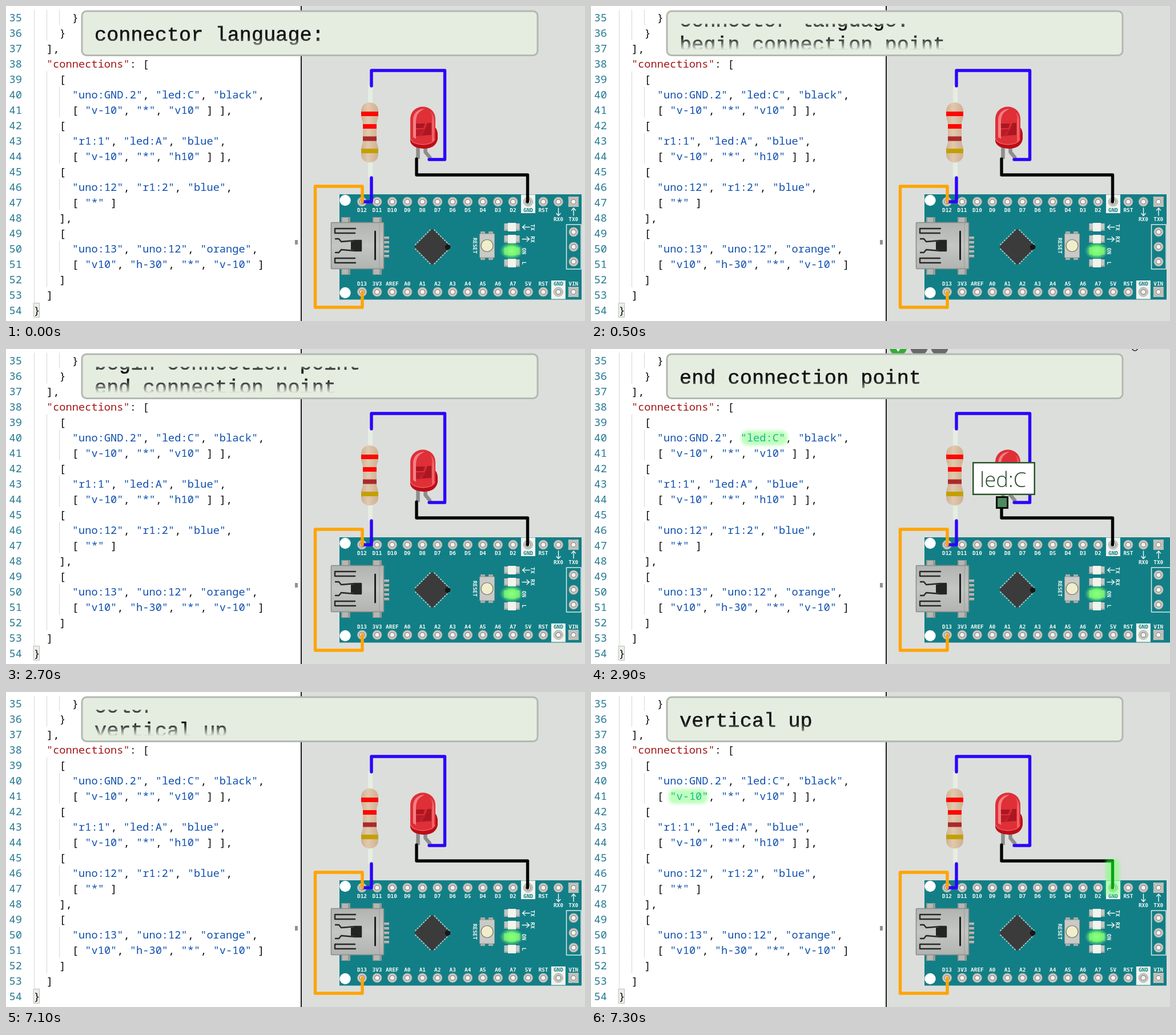
Recreate the animation shown at these times as an HTML page with a canvas. Size 1014x552 px, loop 8000 ms.

```html
<!DOCTYPE html>
<html lang="en">
<head>
<meta charset="utf-8">
<title>Connections explained</title>
<style>
html, body { margin: 0; width: 100%; height: 100%; overflow: hidden; background: #fff; }
canvas { display: block; }
</style>
</head>
<body>
<canvas id="stage" width="1014" height="552"></canvas>
<script>
(() => {
const ctx = document.getElementById('stage').getContext('2d');
const TAU = Math.PI * 2;
const CODE = '18.7px "Noto Sans Mono", "DejaVu Sans Mono", monospace';
const SILK = 'bold 9.4px "DejaVu Sans Mono", monospace';
const TITLE = '35.25px "Liberation Mono", "Courier New", monospace';
const LABEL = '300 36.5px "Open Sans", "Noto Sans", sans-serif';
const TEAL = '#127f86';

function rect(x, y, w, h, fill) {
  ctx.fillStyle = fill;
  ctx.fillRect(x, y, w, h);
}

function round(x, y, w, h, r, fill, stroke, width = 1) {
  ctx.beginPath();
  ctx.roundRect(x, y, w, h, r);
  if (fill) { ctx.fillStyle = fill; ctx.fill(); }
  if (stroke) { ctx.strokeStyle = stroke; ctx.lineWidth = width; ctx.stroke(); }
}

function disc(x, y, r, fill, stroke, width = 1) {
  ctx.beginPath();
  ctx.arc(x, y, r, 0, TAU);
  if (fill) { ctx.fillStyle = fill; ctx.fill(); }
  if (stroke) { ctx.strokeStyle = stroke; ctx.lineWidth = width; ctx.stroke(); }
}

function line(d, color, width, cap = 'round') {
  ctx.strokeStyle = color;
  ctx.lineWidth = width;
  ctx.lineCap = cap;
  ctx.lineJoin = 'round';
  ctx.stroke(new Path2D(d));
}

function shape(d, fill) {
  ctx.fillStyle = fill;
  ctx.fill(new Path2D(d));
}

function text(str, x, y, font, fill, align = 'left') {
  ctx.font = font;
  ctx.fillStyle = fill;
  ctx.textAlign = align;
  ctx.fillText(str, x, y);
}

function turned(str, x, y) {
  ctx.save();
  ctx.translate(x, y);
  ctx.rotate(Math.PI / 2);
  text(str, 0, 3.4, SILK, '#f2f7f4', 'center');
  ctx.restore();
}

// ---- code editor ----
const rows = [
  '      }', '    }', '  ],', '  "connections": [', '    [',
  '      "uno:GND.2", "led:C", "black",', '      [ "v-10", "*", "v10" ] ],', '    [',
  '      "r1:1", "led:A", "blue",', '      [ "v-10", "*", "h10" ] ],', '    [',
  '      "uno:12", "r1:2", "blue",', '      [ "*" ]', '    ],', '    [',
  '      "uno:13", "uno:12", "orange",', '      [ "v10", "h-30", "*", "v-10" ]',
  '    ]', '  ]', '}'
];
const colX = n => 48.5 + 11.22 * n;

function editor() {
  rect(0, 0, 517, 552, '#fff');
  rows.forEach((row, i) => {
    const y = 20 + 27 * i;
    const indent = row.search(/\S/);
    for (let c = 0; c < indent; c += 2) rect(Math.round(colX(c)), y - 13.5, 1, 27, '#d6d6d6');
    if (!indent) round(48.5, y - 12.5, 10, 25, 0, '#eaf0e8', '#b9b9b9');
    text(35 + i, 5.5, y + 6.5, CODE, '#237893');
    for (const m of row.matchAll(/"[^"]*"|[^\s"]+/g)) {
      const s = m[0];
      const color = s === '"connections"' ? '#a31515' : s[0] === '"' ? '#0f4fae' : '#0c0c0c';
      text(s, colX(m.index), y + 6.5, CODE, color);
    }
  });
  rect(506, 410, 5, 8, '#929292');
  rect(516, 0, 2, 552, '#1c1c1c');
}

// ---- circuit ----
const upperPins = 'D12 D11 D10 D9 D8 D7 D6 D5 D4 D3 D2 GND RST RX0 TX0'.split(' ');
const lowerPins = 'D13 3V3 AREF A0 A1 A2 A3 A4 A5 A6 A7 5V RST GND VIN'.split(' ');
const pinX = i => 623.5 + 26.45 * i;

function pin(x, y, square) {
  if (square) rect(x - 9, y - 9, 18, 18, '#c3c3be');
  disc(x, y, 8, '#cbcac5', '#a9aaa6');
  disc(x, y, 4.3, '#f4f5f3', '#8e8f8c', 1.4);
}

function header(names, y, labelY, boxY) {
  names.forEach((name, i) => {
    const x = pinX(i), gnd = name === 'GND';
    const low = /[RT]X0/.test(name);
    if (gnd) rect(x - 12.5, boxY, 25, 32.5, '#f1f5f0');
    pin(x, y, i === 14);
    text(name, x, low ? 376.5 : labelY, SILK, gnd ? TEAL : '#f4f8f5', 'center');
  });
}

function usb() {
  for (const x of [587, 642]) for (const y of [370, 459]) {
    rect(x, y, 16, 12, '#969995');
    rect(x + 2, y + 1, 10, 10, '#b4b7b3');
  }
  for (let i = 0; i < 5; i++) {
    rect(661, 404 + i * 8, 10, 5, '#b9bbb7');
    rect(661, 407.5 + i * 8, 10, 1.5, '#808480');
  }
  const g = ctx.createLinearGradient(0, 380, 0, 460);
  g.addColorStop(0, '#b2b4b1');
  g.addColorStop(0.5, '#c4c6c3');
  g.addColorStop(1, '#b2b4b1');
  round(569.5, 379.5, 92, 81, 1, g, '#8a8c89', 1.6);
  line('M654 381V459', '#a0a29f', 1.2);
  line('M612 390H576V398H611M612 450H576V442H611', '#272727', 2.4);
  line('M577 408L583 408L587 413L611 411H622V429H611L587 427L583 432L577 432', '#272727', 2.4);
  shape('M604 413L623 410V430L604 427Z', '#242424');
  line('M646.5 395V444', '#1f1f1f', 3);
}

function chip() {
  ctx.save();
  ctx.translate(746.5, 422);
  ctx.rotate(Math.PI / 4);
  for (let side = 0; side < 4; side++) {
    for (let i = -3.5; i <= 3.5; i++) rect(i * 5 - 1.4, -24.5, 2.8, 4, '#c4c8c4');
    ctx.rotate(Math.PI / 2);
  }
  round(-22.5, -22.5, 45, 45, 2, '#3b3b3c');
  ctx.restore();
  disc(773.5, 422.5, 4.8, '#171717');
}

function resetAndLeds() {
  turned('RESET', 821.5, 420);
  for (const x of [831, 845]) for (const y of [395, 439]) rect(x, y, 8, 6, '#a9aba7');
  round(829.5, 399, 26, 42, 1, '#c9cac7', '#94978f');
  disc(842.5, 420, 10.5, '#f0eeca', '#77796f', 1.2);
  for (let i = 0; i < 4; i++) {
    const y = 387.5 + 21 * i;
    rect(872.5, y - 6.5, 27, 13, '#c3c5c1');
    rect(879, y - 7.5, 14, 15, '#f2f4ee');
    rect(872.5, y + 4, 6.5, 2.5, '#a4a8a3');
    rect(893, y + 4, 6.5, 2.5, '#a4a8a3');
  }
  const g = ctx.createRadialGradient(0, 0, 1, 0, 0, 21);
  g.addColorStop(0, '#8cff80');
  g.addColorStop(0.5, 'rgba(112,246,108,.95)');
  g.addColorStop(1, 'rgba(80,230,110,0)');
  ctx.save();
  ctx.translate(885.5, 429);
  ctx.scale(1, 0.72);
  disc(0, 0, 21, g);
  ctx.restore();
  line('M917 387.5H905M909 383.5L904.5 387.5L909 391.5', '#f2f7f4', 1.5);
  line('M904 408.5H916M912 404.5L916.5 408.5L912 412.5', '#f2f7f4', 1.5);
  turned('TX', 922.5, 388);
  turned('RX', 922.5, 409);
  turned('ON', 907, 429.5);
  turned('L', 907, 450.5);
}

function board(edge) {
  rect(584, 330, edge - 584, 184.5, TEAL);
  disc(594, 340.5, 9.7, '#fff');
  disc(594, 502.5, 9.7, '#fff');
  header(upperPins, 343, 361.3, 330.5);
  header(lowerPins, 501, 490.3, 481);
  line('M967.5 354V367M964 363.5L967.5 367.5L971 363.5', '#f2f7f4', 1.4);
  line('M994 367V354M990.5 358L994 354L997.5 358', '#f2f7f4', 1.4);
  round(981.5, 383, edge > 1008 ? 40 : 25.5, 78, 0, null, '#dcebe8', 1.5);
  for (const y of [396, 422, 448]) pin(994, y);
  usb();
  chip();
  resetAndLeds();
}

function resistor() {
  rect(634, 139, 8, 162, '#e6ede2');
  const g = ctx.createLinearGradient(622, 0, 652, 0);
  g.addColorStop(0, '#cfb294');
  g.addColorStop(0.4, '#e2c9ae');
  g.addColorStop(1, '#cdb091');
  const body = new Path2D('M622 184C622 164 652 164 652 184V190C652 200 649 200 649 208V236' +
    'C649 244 652 244 652 252V260C652 279 622 279 622 260V252C622 244 625 244 625 236V208C625 200 622 200 622 190Z');
  ctx.fillStyle = g;
  ctx.fill(body);
  ctx.save();
  ctx.clip(body);
  rect(620, 185, 34, 8, '#fe0705');
  rect(620, 207, 34, 8, '#fe0705');
  rect(620, 228.5, 34, 8, '#aa2a2c');
  rect(620, 250, 34, 8, '#c3a000');
  ctx.restore();
}

function led() {
  line('M721.5 245V268', '#8d8d8d', 6.5, 'butt');
  line('M734.5 245V256L742 265', '#8d8d8d', 6.5);
  shape('M708 226H745L751 212Q756 217 756 226V233Q753 250 731 250Q711 249 708 237Z', '#bd0d17');
  shape('M708 199C708 169 752 169 752 199V232C751 246 709 246 708 232Z', '#df2f37');
  shape('M717 206H734L731 214H718ZM738 205H745V226L728 227ZM718 216L733 216L722 228H718Z', '#aa1722');
  shape('M718 216H733L742 205L728 228H718Z', 'rgba(190,30,42,.75)');
  shape('M713 202C713 186 722 181 733 180C723 185 718 190 718 203V233L713 230Z', 'rgba(255,170,172,.65)');
  shape('M746 202Q748 190 742 185Q750 190 750 203V235L746 238Z', 'rgba(248,120,124,.7)');
  line('M709 233C713 246 747 246 751 233', '#ef6166', 1.3);
}

function wires() {
  line('M640 140V113H768.5V269H741', '#2b04fb', 5.4);
  line('M640 301V343H624', '#2b04fb', 5.4);
  line('M624 343V316H541.5V528H624V501', '#ffa403', 5.4);
  line('M719 268V296H913.5V343', '#050505', 5.4);
}

// ---- overlays ----
function glow(x, y, w, h, r) {
  ctx.save();
  ctx.filter = 'blur(2.5px)';
  ctx.globalCompositeOperation = 'screen';
  round(x, y, w, h, r, 'rgb(10,162,18)');
  ctx.globalCompositeOperation = 'multiply';
  round(x, y, w, h, r, 'rgb(192,255,190)');
  ctx.restore();
}

function tag(str, x, y, w) {
  rect(x, y, w, 58, '#2c552c');
  rect(x + 2.5, y + 2.5, w - 5, 53, '#fff');
  text(str, x + 13, y + 44, LABEL, '#284a2a');
}

function marker(x, y, fill) {
  rect(x - 11, y - 11, 22, 22, '#070907');
  rect(x - 8, y - 8, 16, 16, fill);
}

function buttons() {
  disc(538, -4, 15.5, '#30ae35');
  shape('M533 -2H543L538 5Z', '#e8f5e6');
  disc(574.5, -4, 15.5, '#686b69');
  disc(610.5, -4, 15.5, '#686b69');
  disc(952.5, -2, 5, null, '#222', 1.6);
}

const titles = ['connector language:', 'begin connection point', 'end connection point', 'color', 'vertical up'];

function banner(k, sliding) {
  round(133, 9, 798, 77.5, 8, '#e5ede1', '#b3b8b1', 3);
  const g = ctx.createLinearGradient(0, 31, 0, 77);
  g.addColorStop(0, 'rgba(18,18,18,.5)');
  g.addColorStop(0.14, 'rgba(18,18,18,1)');
  g.addColorStop(0.5, 'rgba(18,18,18,1)');
  g.addColorStop(0.75, 'rgba(18,18,18,.55)');
  g.addColorStop(1, 'rgba(18,18,18,0)');
  ctx.save();
  ctx.beginPath();
  ctx.rect(140, 31, 780, 46);
  ctx.clip();
  ctx.strokeStyle = g;
  ctx.lineWidth = 0.6;
  const write = (str, y) => {
    text(str, 155, y, TITLE, g);
    ctx.strokeText(str, 155, y);
  };
  write(titles[k], sliding ? 35.5 : 60.5);
  if (sliding) write(titles[k + 1], 78);
  ctx.restore();
}

const details = [
  () => {},
  () => {
    glow(111, 143, 127, 26, 10);
    tag('uno:GND.2', 809, 272, 212);
    marker(913, 343.5, '#40663f');
    line('M913.5 334V343', '#050505', 5);
  },
  () => {
    glow(263, 143, 81, 26, 10);
    tag('led:C', 668, 198, 110);
    marker(720, 269, '#4d8a5e');
  },
  () => {
    glow(360, 143, 85, 26, 10);
    glow(771, 283.5, 67, 25, 6);
  },
  () => {
    glow(136, 170, 68, 26, 10);
    glow(901, 293, 25, 64, 5);
  }
];

const ends = [500, 700, 2700, 2900, 4900, 5100, 7100, 7300, 8000];

function draw(phase) {
  const k = phase >> 1, sliding = phase % 2 === 1;
  const panned = k === 2 && !sliding;
  rect(518, 0, 496, 552, '#dcdedc');
  editor();
  board(panned ? 1014 : 1008);
  resistor();
  led();
  wires();
  if (panned) buttons();
  if (!sliding) details[k]();
  banner(k, sliding);
}

const start = performance.now();
let shown = -1;

function tick() {
  const t = (performance.now() - start) % 8000;
  const phase = ends.findIndex(end => t < end);
  if (phase !== shown) draw(shown = phase);
  requestAnimationFrame(tick);
}
tick();
})();
</script>
</body>
</html>
```
